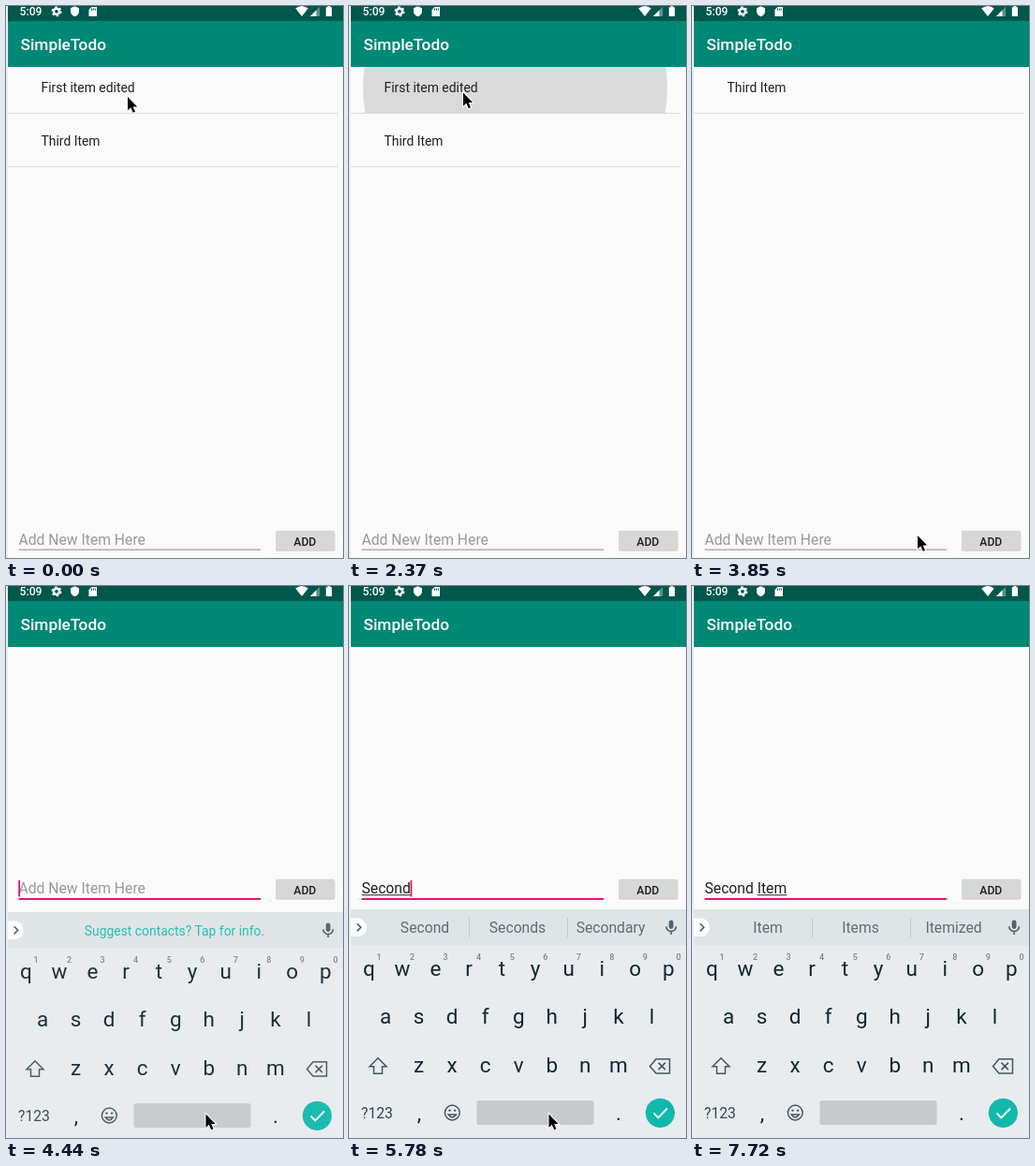
These frames come from a looping animation (360 by 589 pixels, 8 s). An HTML page:

```html
<!DOCTYPE html>
<html lang="en">
<head>
<meta charset="utf-8">
<title>Todo list</title>
<style>
  html, body { margin: 0; width: 100%; height: 100%; overflow: hidden; background: #fafafa; }
  svg { display: block; font-family: Roboto, sans-serif; }
  text { white-space: pre; }
  .mid { text-anchor: middle; }
  .medium { font-weight: 500; }
  .item { font-size: 13.9px; fill: #202020; }
  .field { font-size: 15.7px; }
  .key { font-size: 22.5px; fill: #14262f; }
  .digit { font-size: 9px; font-weight: 500; fill: #78868d; }
  .tip { font-size: 15.7px; fill: #5f6d74; }
  .line { fill: none; stroke: #46575f; stroke-width: 1.5; }
</style>
</head>
<body>
<svg width="360" height="589" viewBox="0 0 360 589">
  <defs>
    <clipPath id="row"><rect x="2" y="65" width="352" height="49"/></clipPath>
  </defs>
  <rect width="360" height="589" fill="#fafafa"/>

  <g id="page">
    <g clip-path="url(#row)"><circle id="ripple" cx="177.5" cy="87" fill="#dadada"/></g>
    <g id="list"></g>
    <text id="hint" class="field" x="13.5" y="575" fill="#999">Add New Item Here</text>
    <text class="field" x="13.5" y="575" fill="#202020"><tspan id="done"></tspan><tspan id="draft"></tspan></text>
    <rect id="draftLine" y="576.3" height="1" fill="#202020"/>
    <rect id="caret" y="561" width="1.8" height="17.5" fill="#e0186c"/>
    <rect id="underline" x="13.5" width="258.5"/>
    <rect x="288" y="561" width="63.5" height="20.7" rx="2" fill="#000" opacity=".16"/>
    <rect x="288" y="559.7" width="63" height="20.3" rx="1.7" fill="#d6d7d7"/>
    <text class="mid medium" x="319.3" y="576.3" font-size="12.2" fill="#202020">ADD</text>
  </g>

  <rect y="16" width="360" height="49" fill="#008876"/>
  <rect width="360" height="16" fill="#00574b"/>
  <text class="medium" x="15.5" y="46.8" font-size="17.3" fill="#fff">SimpleTodo</text>
  <g id="status" fill="#fff">
    <text class="medium" x="14.5" y="10.3" font-size="12.2">5:09</text>
    <circle cx="54" cy="5.8" r="3.1" fill="none" stroke="#fff" stroke-width="2.4"/>
    <circle cx="54" cy="5.8" r="4.6" fill="none" stroke="#fff" stroke-width="1.8" stroke-dasharray="2.4 2.417"/>
    <path d="M73.5 .3L78 2.2V5.5Q78 9.6 73.5 11.3Q69 9.6 69 5.5V2.2Z"/>
    <path d="M91.5 1H97V11H88.5V4Z"/>
    <path d="M91.5 2.5v2.2m1.9-2.2v2.2m1.9-2.2v2.2" stroke="#00574b"/>
    <path d="M309.2 2.6Q316 -2.4 322.8 2.6L316 11Z"/>
    <path d="M325 11L335.2 .8V11Z" opacity=".35"/>
    <path d="M325 11L331.5 4.5V11Z"/>
    <path d="M341.8 1.3H343.5V0H346.3V1.3H348V11H341.8Z"/>
  </g>

  <g id="keyboard">
    <rect x="2" y="345" width="358" height="244" fill="#e8ecef"/>
    <rect x="2" y="345" width="358" height="38.5" fill="#dfe4e7"/>
    <path d="M2 354.5H10A9.8 9.8 0 0 1 10 374H2Z" fill="#fff"/>
    <path class="line" d="M8.6 360.2L12.7 364.3L8.6 368.4" stroke-width="1.8"/>
    <g id="tips"></g>
    <rect x="341.7" y="356.5" width="4.8" height="9.5" rx="2.4" fill="#52636b"/>
    <path class="line" d="M338.8 363.3A5.3 5.3 0 0 0 349.4 363.3M344.1 368.5V372"/>
    <g id="keys"></g>
    <path class="line" d="M31 503.8L40 512.8H35.5V520.3H26.5V512.8H22Z"/>
    <path class="line" d="M328 504.8H342.5V520H328L321.5 512.4ZM330.5 508.6L338 516.1M338 508.6L330.5 516.1"/>
    <circle class="line" cx="110.3" cy="562" r="7.9"/>
    <path class="line" d="M106.2 564Q110.3 569.8 114.4 564Z" fill="#46575f" stroke-width=".5"/>
    <circle cx="107.5" cy="559.6" r="1.2" fill="#46575f"/>
    <circle cx="113.1" cy="559.6" r="1.2" fill="#46575f"/>
    <rect x="136.5" y="549" width="125" height="26" rx="2.5" fill="#c6cacd"/>
    <circle cx="332.4" cy="562.3" r="15.6" fill="#10b9ab"/>
    <path d="M325.5 562.5L330.3 567.3L340 557.5" fill="none" stroke="#fff" stroke-width="1.9"/>
  </g>

  <rect width="2" height="589" fill="#ededed"/>
  <path id="mouse" d="M0 0V14.3L3.3 11.3L5.7 16.8L8 15.8L5.7 10.4H10.2Z" stroke="#fff" stroke-width="2" paint-order="stroke"/>
</svg>

<script>
const LOOP = 8000, PAN = 247;
const $ = id => document.getElementById(id);
const text = (cls, x, y, s) => `<text class="${cls}" x="${x}" y="${y}">${s}</text>`;
const set = (id, attrs) => {
  for (const name in attrs) $(id).setAttribute(name, attrs[name]);
};
const show = (id, on) => { $(id).style.display = on ? '' : 'none'; };

function keyRow(letters, x, y) {
  return [...letters].map((c, i) => text('key mid', x + i * 35.55, y, c)).join('');
}

$('keys').innerHTML =
  keyRow('qwertyuiop', 21.3, 416) +
  keyRow('asdfghjkl', 39, 467) +
  keyRow('zxcvbnm', 74.5, 518.5) +
  [...'1234567890'].map((c, i) => text('digit mid', 32 + i * 35.55, 399, c)).join('') +
  `<text class="mid" x="30" y="567.5" font-size="15.7" fill="#33454e">?123</text>` +
  text('key mid', 75, 570, ',') + text('key mid', 288, 570, '.');

const start = {
  t: 0, mouse: [130, 97], items: ['First item edited', 'Third Item'],
  ripple: 0, fade: 1, pan: 0, kb: null, kbAlpha: 1,
  focus: false, caret: false, done: '', draft: '', tips: null
};

// Each step lists only what changes at time t.
const steps = [
  { t: 590, mouse: [124, 140] },
  { t: 740, mouse: [127, 106] },
  { t: 1930, mouse: [122, 93.5] },
  { t: 2080, mouse: [122, 92.5] },
  { t: 2370, ripple: 162.5 },
  { t: 2520, ripple: 200 },
  { t: 2670, fade: .5, items: ['Third Item'] },
  { t: 2810, ripple: 0 },
  { t: 3260, mouse: [301, 440] },
  { t: 3400, mouse: [241, 565] },
  { t: 4000, focus: true, caret: true },
  { t: 4150, pan: 137, kb: 110, kbAlpha: .8 },
  { t: 4290, pan: PAN, kb: 22, kbAlpha: .9, mouse: [225, 564] },
  { t: 4440, kb: 3, kbAlpha: .95, mouse: [213.5, 563.5] },
  { t: 4580, kb: 0, kbAlpha: 1 },
  { t: 4730, caret: false },
  { t: 5180, caret: true, draft: 'S', tips: ['S', 'So', 'She'] },
  { t: 5330, draft: 'Sec', tips: ['Sec', 'Second', 'Section'] },
  { t: 5480, draft: 'Seco', tips: ['Seco', 'Second', 'Seconds'] },
  { t: 5630, draft: 'Secon', tips: ['Secon', 'Second', 'Seconds'] },
  { t: 5780, draft: 'Second', tips: ['Second', 'Seconds', 'Secondary'] },
  { t: 5930, done: 'Second ', draft: '', tips: ['half', 'time', 'chances'] },
  { t: 6380, draft: 'I', tips: ['I', 'It', 'In'] },
  { t: 6670, draft: 'It', tips: ['It', 'Its', 'Items'] },
  { t: 6820, draft: 'Ite', tips: ['Ite', 'Item', 'Items'] },
  { t: 6970, draft: 'Item', tips: ['Item', 'Items', 'Itemized'] },
  { t: 7420, caret: false },
  { t: 7570, mouse: [268, 470] },
  { t: 7720, mouse: null }
];

const states = [start];
for (const step of steps) states.push({ ...states.at(-1), ...step });

function drawList(items) {
  $('list').innerHTML = items.map((name, i) =>
    text('item', 37.5, 92 + 57 * i, name) +
    `<rect x="2" y="${114 + 57 * i}" width="352" height="1" fill="#dcdcdc"/>`).join('');
}

function drawTips(tips) {
  $('tips').innerHTML = tips
    ? tips.map((s, i) => text('tip mid', [81, 180, 279.5][i], 370.3, s)).join('') +
      [128, 233].map(x => `<rect x="${x}" y="354" width="1" height="21" fill="#c3cace"/>`).join('')
    : '<text class="mid" x="180" y="370" font-size="13.9" fill="#1dbcb0">Suggest contacts? Tap for info.</text>';
}

function drawField(s) {
  $('done').textContent = s.done;
  $('draft').textContent = s.draft;
  const doneWidth = s.done ? $('done').getComputedTextLength() : 0;
  const draftWidth = s.draft ? $('draft').getComputedTextLength() : 0;
  set('draftLine', { x: 13.5 + doneWidth, width: draftWidth });
  set('caret', { x: 13.2 + doneWidth + draftWidth });
  set('underline', s.focus
    ? { y: 580, height: 2, fill: '#e0186c' }
    : { y: 579.6, height: 1, fill: '#8a8a8a' });
  show('hint', !s.done && !s.draft);
  show('caret', s.caret);
}

function draw(s) {
  set('page', { transform: `translate(0 ${-s.pan})` });
  set('ripple', { r: s.ripple, opacity: s.fade });
  drawList(s.items);
  drawField(s);
  drawTips(s.tips);
  show('keyboard', s.kb !== null);
  set('keyboard', { transform: `translate(0 ${s.kb || 0})`, opacity: s.kbAlpha });
  show('mouse', s.mouse);
  if (s.mouse) set('mouse', { transform: `translate(${s.mouse})` });
}

const began = performance.now();
let current;
function tick() {
  const t = (performance.now() - began) % LOOP;
  const state = states.findLast(s => s.t <= t);
  if (state !== current) draw(current = state);
  requestAnimationFrame(tick);
}
tick();
</script>
</body>
</html>
```
